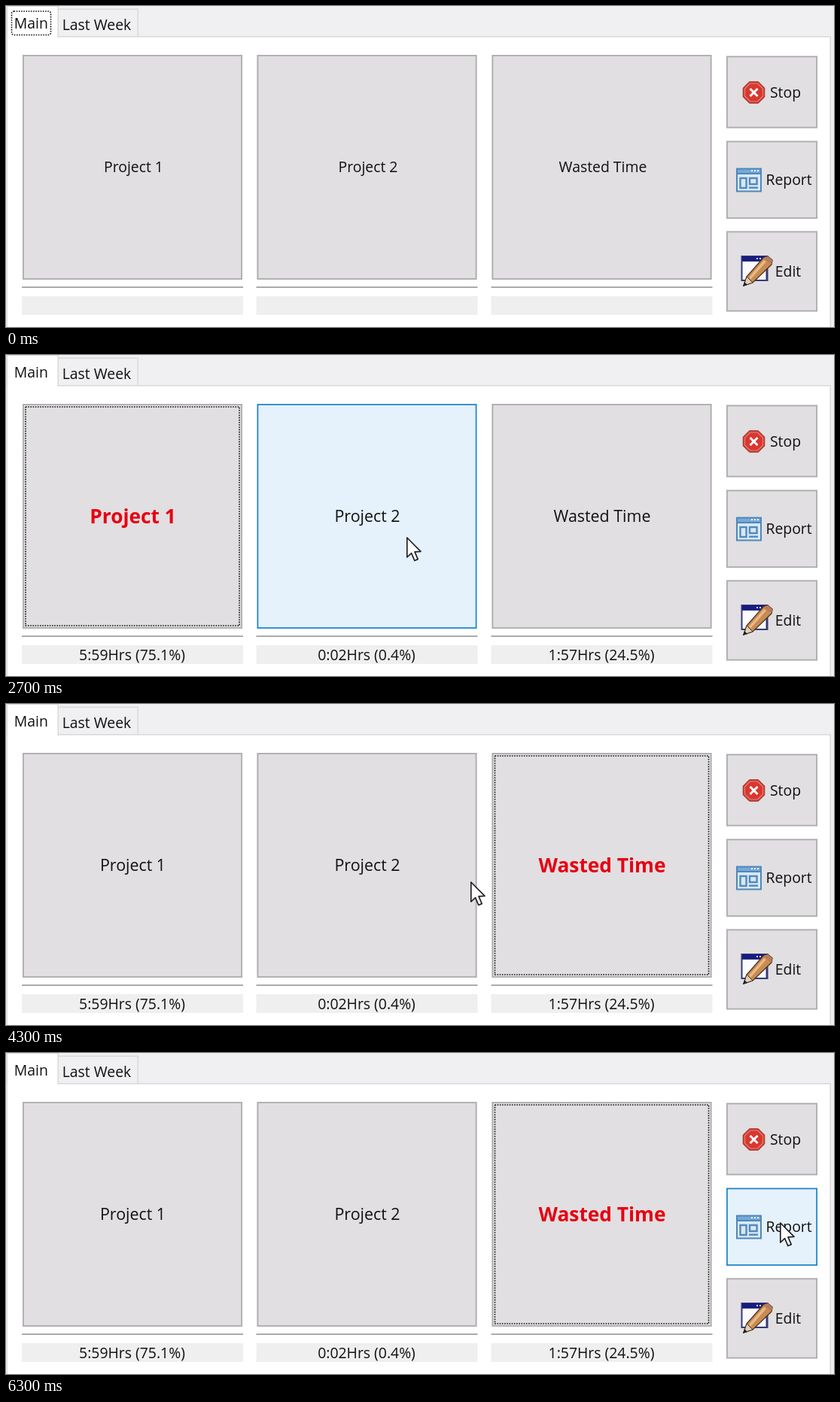
These frames come from a looping animation (1100 by 427 pixels, 8 s). An HTML page with a canvas:

```html
<!DOCTYPE html>
<html lang="en">
<head>
<meta charset="utf-8">
<style>
  html, body { margin: 0; width: 1100px; height: 427px; overflow: hidden; background: #fff; }
  canvas { display: block; }
</style>
</head>
<body>
<canvas id="stage" width="1100" height="427"></canvas>
<script>
const ctx = document.getElementById('stage').getContext('2d');
const LOOP = 8000, TICK = 100;
const FACE = '"Open Sans", "Noto Sans", sans-serif';

const projects = [
  { name: 'Project 1', x: 22, y: 65, w: 292, h: 299, time: '5:59Hrs (75.1%)' },
  { name: 'Project 2', x: 333.5, y: 65, w: 292, h: 299, time: '0:02Hrs (0.4%)' },
  { name: 'Wasted Time', x: 645.5, y: 65, w: 292, h: 299, time: '1:57Hrs (24.5%)' }
];
const tools = [
  { name: 'Stop', x: 957, y: 66.5, w: 121, h: 96, textX: 1035.5, baseline: 122, icon: stopIcon },
  { name: 'Report', x: 957, y: 179.5, w: 121, h: 103.5, textX: 1040, baseline: 238, icon: reportIcon },
  { name: 'Edit', x: 957, y: 299.5, w: 121, h: 107, textX: 1039, baseline: 360, icon: editIcon }
];

// Pointer way-points: time, x, y
const path = [
  [600, 88, 424], [1100, 106, 302], [1500, 150, 250], [1800, 158, 242], [2300, 170, 240],
  [2700, 532, 242], [3000, 600, 240], [3300, 690, 236], [3700, 754, 233], [4000, 754, 233],
  [4200, 634, 235], [4300, 617, 236], [4600, 575, 238], [4900, 620, 234], [5200, 730, 228],
  [5600, 806, 225], [5900, 938, 225], [6300, 1028, 225]
];
const clicks = [
  { target: projects[0], down: 1700, up: 1900 },
  { target: projects[2], down: 3600, up: 3900 }
];

function pointerAt(t) {
  if (t < path[0][0]) return null;
  const next = path.findIndex(p => p[0] > t);
  if (next < 0) return path[path.length - 1].slice(1);
  const [t0, x0, y0] = path[next - 1], [t1, x1, y1] = path[next];
  const k = (t - t0) / (t1 - t0);
  return [x0 + (x1 - x0) * k, y0 + (y1 - y0) * k];
}

function rect(x, y, w, h, color) {
  ctx.fillStyle = color;
  ctx.fillRect(x, y, w, h);
}

function poly(points, fill, stroke, width) {
  ctx.beginPath();
  points.forEach(([x, y]) => ctx.lineTo(x, y));
  ctx.closePath();
  if (fill) { ctx.fillStyle = fill; ctx.fill(); }
  if (stroke) { ctx.strokeStyle = stroke; ctx.lineWidth = width; ctx.stroke(); }
}

function text(str, x, baseline, size = 19.4, color = '#111', weight = 400) {
  ctx.font = `${weight} ${size}px ${FACE}`;
  ctx.textAlign = 'center';
  ctx.fillStyle = color;
  ctx.fillText(str, x, baseline);
}

function focusRing(x, y, w, h, radius = 0) {
  ctx.strokeStyle = '#111';
  ctx.lineWidth = 1.6;
  ctx.setLineDash([1.6, 1.6]);
  ctx.beginPath();
  ctx.roundRect(x, y, w, h, radius);
  ctx.stroke();
  ctx.setLineDash([]);
}

function button(b, state) {
  const [fill, edge] = {
    idle: ['#e1dfe1', '#adacae'],
    hover: ['#e5f1fb', '#2587cb'],
    down: ['#cde4f7', '#176299']
  }[state];
  rect(b.x, b.y, b.w, b.h, fill);
  ctx.strokeStyle = edge;
  ctx.lineWidth = 1.8;
  ctx.strokeRect(b.x + 0.9, b.y + 0.9, b.w - 1.8, b.h - 1.8);
}

function stopIcon() {
  const octagon = r => Array.from({ length: 8 }, (_, i) => {
    const a = (i + 0.5) * Math.PI / 4;
    return [993.5 + r * Math.cos(a), 115 + r * Math.sin(a)];
  });
  poly(octagon(15.5), '#c5382f', '#a93c34', 1);
  poly(octagon(13), '#d9372e', '#e58379', 1.2);
  ctx.strokeStyle = '#fff';
  ctx.lineWidth = 3;
  ctx.beginPath();
  for (const s of [-1, 1]) {
    ctx.moveTo(993.5 - 5, 115 - 5 * s);
    ctx.lineTo(993.5 + 5, 115 + 5 * s);
  }
  ctx.stroke();
}

function reportIcon() {
  rect(970, 215.5, 34, 32, '#4f87ba');
  rect(972, 217.5, 30, 4.5, '#76a9d8');
  for (const x of [990, 994, 998]) rect(x, 218, 2, 2, '#e8f2fb');
  rect(972, 224, 30, 21.5, '#d9e8f4');
  ctx.strokeStyle = '#5089bd';
  ctx.lineWidth = 2.4;
  ctx.strokeRect(975.5, 229, 8, 13);
  ctx.strokeRect(988, 229, 9.5, 8);
  rect(987, 240.5, 12, 2.4, '#5089bd');
}

function editIcon() {
  rect(976.5, 332, 36, 34, '#343a78');
  rect(978.5, 340, 31, 24, '#fbfbff');
  rect(978, 333, 32, 6, '#171a80');
  for (const x of [997, 1001, 1005]) rect(x, 335, 2, 2, '#d5d7ff');
  poly([[980, 372], [984, 360], [1006, 335], [1012, 333], [1018, 338], [1017, 344], [992, 368]],
    '#c98b50', '#4a3527', 1.4);
  poly([[987, 361], [1007, 338], [1010, 340], [989, 364]], '#e9b985');
  poly([[1006, 335], [1012, 333], [1018, 338], [1017, 344]], '#b77b5d');
  poly([[980, 372], [984, 360], [992, 368]], '#e6cfb0', '#3a302b', 1);
  poly([[979, 373], [981, 367], [985, 371]], '#222');
}

function drawPointer([x, y]) {
  const arrow = [[0.8, 1], [0.8, 27], [6.6, 21.6], [10.8, 31.5], [15.2, 29.6], [11, 19.8], [19, 19.3]];
  ctx.lineJoin = 'round';
  poly(arrow.map(([dx, dy]) => [x + dx, y + dy]), '#fff', '#222', 1.7);
  ctx.lineJoin = 'miter';
}

function drawTabs(mainFocused) {
  rect(0, 0, 1100, 427, '#f0eff1');
  rect(1, 40, 1095, 387, '#d9d8da');
  rect(2, 41.5, 1092.5, 386, '#fff');
  rect(69, 3.5, 107, 37, '#d9d8da');
  rect(70, 5, 104.5, 35, '#f0eff1');
  rect(0.5, 0, 69.5, 42, '#d9d8da');
  rect(2, 1, 66.5, 42, '#fff');
  text('Main', 33.3, 30);
  text('Last Week', 120.5, 31.7);
  if (mainFocused) focusRing(7.5, 7, 52, 31.5, 3);
}

function drawProject(p, state, focused, active, started) {
  button(p, state);
  if (focused) focusRing(p.x + 4, p.y + 4, p.w - 8, p.h - 8);
  const cx = p.x + p.w / 2 + 0.5, shift = state === 'down' ? 1.5 : 0;
  if (active) text(p.name, cx, 224, 26.3, state === 'idle' ? '#e60012' : '#000', 700);
  else if (started) text(p.name, cx + shift, 222 + shift, 21.4);
  else text(p.name, cx + 1, 220.5);
  rect(p.x - 1, 373.2, p.w + 2, 1.8, '#a3a2a4');
  rect(p.x - 1, 386, p.w + 2, 25, '#f0eff0');
  if (started) text(p.time, cx - 1, 405.5);
}

function draw(t) {
  const pointer = pointerAt(t);
  // Hover feedback trails the pointer by one tick.
  const probe = pointerAt(t - TICK);
  const hovered = b => probe && probe[0] >= b.x && probe[0] <= b.x + b.w &&
    probe[1] >= b.y && probe[1] <= b.y + b.h;
  const lastTarget = key => clicks.filter(c => t >= c[key]).pop()?.target;
  const focus = lastTarget('down'), active = lastTarget('up');
  const stateOf = b =>
    clicks.some(c => c.target === b && t >= c.down && t < c.up) ? 'down' :
    hovered(b) ? 'hover' : 'idle';

  drawTabs(!focus);
  for (const p of projects) drawProject(p, stateOf(p), p === focus, p === active, !!active);
  for (const b of tools) {
    button(b, stateOf(b));
    b.icon();
    text(b.name, b.textX, b.baseline);
  }
  if (pointer) drawPointer(pointer);
}

function frame() {
  draw(Math.floor(performance.now() % LOOP / TICK) * TICK);
  requestAnimationFrame(frame);
}
frame();
</script>
</body>
</html>
```
